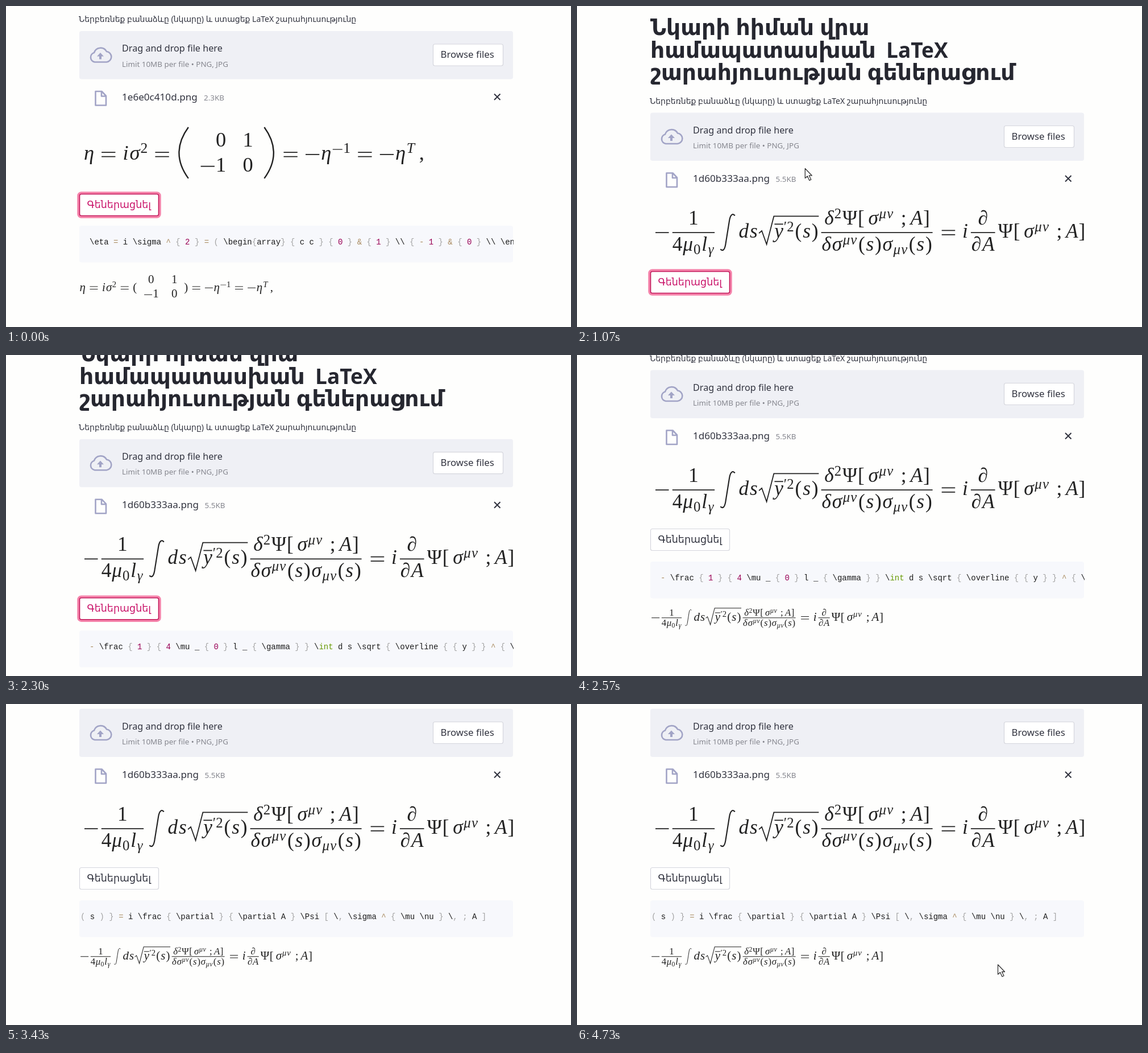
An HTML page that plays this animation: 994 by 564 pixels, repeating every 4.76 s.

```html
<!DOCTYPE html>
<html lang="hy">
<head>
<meta charset="utf-8">
<style>
  html, body { margin: 0; width: 100%; height: 100%; overflow: hidden; background: #fefefd; }
  svg { display: block; font: 16.2px 'Noto Sans', 'DejaVu Sans', sans-serif; fill: #31333f; }
  text { white-space: pre; }
  .title { font-size: 39.2px; font-weight: 700; fill: #262730; }
  .latin { font-size: 37px; }
  .label { font-size: 14px; }
  .hint { font-size: 13.4px; fill: #85868e; }
  .name { font-size: 17.1px; }
  .browse { font-size: 16.8px; }
  .action { font-size: 17.5px; }
  .panel { fill: #eff0f5; }
  .box { fill: #fff; stroke: #d5d6dd; stroke-width: 1.2; }
  .icon { fill: none; stroke: #a2a4c6; stroke-width: 2.6; stroke-linejoin: round; }
  .ring { fill: none; stroke: #f584ab; stroke-width: 4.5; visibility: hidden; }
  .focus .ring { visibility: visible; }
  .focus .box { stroke: #c2185b; stroke-width: 1.6; }
  .focus text { fill: #c9146a; }
  .code { font: 14px 'Liberation Mono', monospace; fill: #1c1c1c; }
  .number { fill: #990055; }
  .mark { fill: #a3a3a3; }
  .operator { fill: #a98a5f; }
  .keyword { fill: #669900; }
  .math { font-family: 'Liberation Serif', serif; fill: #222; }
  .line { fill: none; stroke: #222; }
  .pointer { fill: #fff; stroke: #333; stroke-width: 1.3; stroke-linejoin: round; }
  .status { fill: none; stroke: #a9aab0; stroke-width: 2.4; stroke-linecap: round; }
</style>
</head>
<body>
<svg id="stage" width="994" height="564" viewBox="0 0 994 564"></svg>
<script>
const LOOP = 4760, UPLOADED = 570, PREVIEW = 800, RESULT = 1900, BLUR = 2480;
const CHAR = 8.4, CODE_X = 147;

const codeA = String.raw`\eta = i \sigma ^ { 2 } = ( \begin{array} { c c } { 0 } & { 1 } \\ { - 1 } & { 0 } \\ \end{array} )`;
const codeB = String.raw`- \frac { 1 } { 4 \mu _ { 0 } l _ { \gamma } } \int d s \sqrt { \overline { { y } } ^ { \prime 2 } ( s ) } \frac { \delta ^ { 2 } \Psi [ \, \sigma ^ { \mu \nu } \, ; A ] } { \delta \sigma ^ { \mu \nu } ( s ) \sigma _ { \mu \nu } ( s ) } = i \frac { \partial } { \partial A } \Psi [ \, \sigma ^ { \mu \nu } \, ; A ]`;
const codeShift = codeB.lastIndexOf('( s ) } = i') * CHAR + CODE_X - 130;

const text = (x, y, s, cls = '') => `<text x="${x}" y="${y}" class="${cls}">${s}</text>`;
const group = (id, y, body) => `<g id="${id}" transform="translate(0 ${y})">${body}</g>`;

function highlight(code) {
  const classes = ['number', 'mark', 'operator', 'keyword'];
  return code.replace(/(\d)|([{}[\]();,])|([-^=&])|(\bint\b)/g, (token, ...found) =>
    `<tspan class="${classes[found.findIndex(Boolean)]}">${token.replace('&', '&amp;')}</tspan>`);
}

const codeBlock = (id, y, code) => group(id, y,
  `<rect x="129" width="763" height="64.5" rx="4" fill="#f7f8fc"/>
   <g clip-path="url(#codeClip)"><g id="${id}Text">${text(CODE_X, 33, highlight(code), 'code')}</g></g>`);

// Formula layout: a node maps (em, display) to a box { w, draw(x, baseline) }; lengths are in em.
const AXIS = -0.25, THIN = 0.167;
const ruler = document.createElement('canvas').getContext('2d');
const stroke = (x, y, em, d, width = 0.05) =>
  `<path class="line" transform="translate(${x} ${y}) scale(${em})" stroke-width="${width}" d="${d}"/>`;
const shape = (w, d, width) => em => ({ w: w * em, draw: (x, y) => stroke(x, y, em, d, width) });

const symbols = {
  ' ': shape(THIN, ''),
  '−': shape(0.778, `M.056 ${AXIS}h.666`),
  '=': shape(1.334, 'M.334-.355h.666m-.666.21h.666'),
};

const glyph = char => symbols[char] || (em => {
  const style = /[a-zα-ω∂]/i.test(char) && char !== 'Ψ' ? 'italic' : 'normal';
  ruler.font = `${style} 100px 'Liberation Serif', serif`;
  const bearing = /[a-zα-ω∂()]/i.test(char) ? 0.025 : 0;
  return {
    w: (ruler.measureText(char).width / 100 + 2 * bearing) * em,
    draw: (x, y) => `<text class="math" x="${x + bearing * em}" y="${y}" font-size="${em}" font-style="${style}">${char}</text>`,
  };
});

const row = (...items) => (em, display) => {
  const nodes = items.flatMap(item => typeof item === 'string' ? [...item].map(glyph) : item);
  const boxes = nodes.map(node => node(em, display));
  return {
    w: boxes.reduce((sum, box) => sum + box.w, 0),
    draw: (x, y) => boxes.map(box => { x += box.w; return box.draw(x - box.w, y); }).join(''),
  };
};

const script = (s, rise) => em => {
  const box = row(s)(em * 0.7);
  return { w: box.w + 0.03 * em, draw: (x, y) => box.draw(x, y - rise * em) };
};
const sup = s => script(s, 0.32);
const sub = s => script(s, -0.17);

const frac = (top, bottom) => (em, display) => {
  const boxes = [top, bottom].map(node => node(display ? em : em * 0.8));
  const bar = Math.max(...boxes.map(box => box.w)), pad = 0.12 * em, rise = (display ? 0.65 : 0.43) * em;
  return {
    w: bar + 2 * pad,
    draw: (x, y) => stroke(x + pad, y, em, `M0 ${AXIS}h${bar / em}`) +
      boxes.map((box, i) => box.draw(x + pad + (bar - box.w) / 2, y + (i ? rise : -rise))).join(''),
  };
};

const root = body => em => {
  const box = body(em), sign = 0.78 * em;
  return {
    w: sign + box.w,
    draw: (x, y) => box.draw(x + sign, y) +
      stroke(x, y, em, `M.04-.22l.14-.12 .24.67 .36-1.39h${box.w / em}`),
  };
};

const overline = s => em => {
  const box = row(s)(em);
  return { w: box.w, draw: (x, y) => box.draw(x, y) + stroke(x, y, em, `M.03-.67h${box.w / em - 0.06}`) };
};

const integral = (em, display) => {
  const size = display ? em : em * 0.75;
  return {
    w: 0.72 * size + 2 * THIN * em,
    draw: (x, y) => stroke(x + THIN * em + 0.36 * size, y + AXIS * em, size,
      'M-.36.82c.12.12.2.04.25-.2l.2-1.24c.05-.28.17-.36.27-.22', 0.06),
  };
};

const matrix = (...lines) => (em, display) => {
  const cells = lines.map(line => line.map(s => row(s)(em)));
  const widths = lines[0].map((_, col) => Math.max(...cells.map(line => line[col].w)));
  const pad = (display ? 0.4 : 0.53) * em, align = display ? 1 : 0.5;
  const fence = (char, d) => (display ? shape(0.74, d, 0.065) : glyph(char))(em);
  const open = fence('(', 'M.6-1.56q-.9 1.23 0 2.46'), close = fence(')', 'M.14-1.56q.9 1.23 0 2.46');
  const w = 2 * open.w + widths.reduce((sum, width) => sum + width + 2 * pad, 0);
  return {
    w,
    draw(x, y) {
      let out = open.draw(x, y) + close.draw(x + w - close.w, y), left = x + open.w + pad;
      widths.forEach((width, col) => {
        cells.forEach((line, i) => {
          out += line[col].draw(left + (width - line[col].w) * align, y + (i * 1.2 - 0.63) * em);
        });
        left += width + 2 * pad;
      });
      return out;
    },
  };
};

const bracket = row('Ψ[ σ', sup('μν'), '  ; A]');
const formulaA = row('η=iσ', sup('2'), '=', matrix(['0', '1'], ['−1', '0']),
  '=−η', sup('−1'), '=−η', sup('T'), ' ,');
const formulaB = row('−', frac(row('1'), row('4μ', sub('0'), 'l', sub('γ'))), integral, 'ds',
  root(row(overline('y'), sup('′2'), '(s)')),
  frac(row('δ', sup('2'), bracket), row('δσ', sup('μν'), '(s)σ', sub('μν'), '(s)')),
  '=i', frac(row('∂'), row('∂A')), bracket);

const fileRow = (id, name, size, x) => group(id, 0, text(204, 309, name, 'name') + text(x, 309, size, 'hint'));

stage.innerHTML = `
  <clipPath id="codeClip"><rect x="129" width="764" height="65"/></clipPath>
  <g id="page">
    ${text(129, 51, 'Նկարի հիման վրա', 'title')}
    ${text(129, 90.5, 'համապատասխան', 'title')}
    ${text(544, 90.5, 'LaTeX', 'title latin')}
    ${text(129, 130, 'շարահյուսության գեներացում', 'title')}
    ${text(128, 171.5, 'Ներբեռնեք բանաձևը (նկարը) և ստացեք LaTeX շարահյուսությունը', 'label')}
    <rect class="panel" x="129" y="187.5" width="763" height="84.5" rx="4"/>
    <path class="icon" d="M156 242a8.5 8.5 0 0 1-1-16.5a12 12 0 0 1 22-2a9.3 9.3 0 0 1 0 18.5z"/>
    <path d="M160 232l6-6.5 6 6.5h-4v5h-4v-5z" fill="#a2a4c6"/>
    ${text(204, 223.5, 'Drag and drop file here')}
    ${text(204, 250, 'Limit 10MB per file • PNG, JPG', 'hint')}
    <rect class="box" x="751.5" y="210.5" width="123" height="38" rx="3"/>
    ${text(764.5, 234.5, 'Browse files', 'browse')}
    <path class="icon" d="M157.5 293.5h11l7.5 8v16.5h-18.5zM168 294v8h7.5"/>
    <path d="M859 298l10.5 10.5m0-10.5l-10.5 10.5" stroke="#31333f" stroke-width="2"/>
    ${fileRow('fileA', '1e6e0c410d.png', '2.3KB', 348)}
    ${fileRow('fileB', '1d60b333aa.png', '5.5KB', 349.5)}
    <g id="imageA">${formulaA(36.5, true).draw(136, 413.5)}</g>
    <g id="imageB">${formulaB(35.4, true).draw(136, 407)}</g>
    <g id="button">
      <rect class="ring" x="127.5" y="-1.5" width="143" height="42" rx="5"/>
      <rect class="box" x="129.5" y=".5" width="139" height="38" rx="3"/>
      ${text(142.5, 25, 'Գեներացնել', 'action')}
    </g>
    ${codeBlock('codeA', 529.5, codeA)}
    ${codeBlock('codeB', 524, codeB)}
    <g id="resultA">${formulaA(21, false).draw(129, 644)}</g>
    <g id="resultB">${formulaB(21, false).draw(130, 628)}</g>
  </g>
  <path id="runner" class="status" d="M970 1l6 5 9 8M984 0l-8 7-6 6M975 3l8 3M979 9l7 6"/>
  <path id="swimmer" class="status" d="M967 7q4-4 8 0t8 0 6 0M967 12q4-4 8 0t8 0 6 0M973 2l6-2 5 3"/>
  <g id="cursor" class="pointer">
    <path id="beam" d="M-4-8q4 0 4 2q0-2 4-2M0-6v12M-4 8q4 0 4-2q0 2 4 2" fill="none"/>
    <path id="hand" d="M-4-8q2-3 4 0v5l8 2q2 1 1 5l-2 5h-8l-7-8q0-3 3-1z"/>
    <path id="arrow" d="M0 0v17l4-3.5 3.5 7.5 3-1.5-3.5-7h5z"/>
  </g>`;

const el = id => document.getElementById(id);
const show = (id, on) => el(id).setAttribute('visibility', on ? 'inherit' : 'hidden');
const move = (id, x, y) => el(id).setAttribute('transform', `translate(${x} ${y})`);

// Eased progress from 0 to 1 between two times.
function ease(t, start, end) {
  const u = Math.min(1, Math.max(0, (t - start) / (end - start)));
  return u * u * (3 - 2 * u);
}

function draw(t) {
  const first = t < UPLOADED, preview = t >= PREVIEW, result = t >= RESULT;
  const scroll = first ? 143.5 :
    23 * ease(t, 1200, 1380) + 138 * ease(t, 2240, 2520) + 18 * ease(t, 2700, 2850);
  move('page', 0, -scroll);
  for (const id of ['fileA', 'imageA', 'codeA', 'resultA']) show(id, first);
  show('fileB', !first);
  show('imageB', preview);
  show('codeB', result);
  show('resultB', result);
  move('button', 0, first ? 473.5 : preview ? 466 : 347);
  el('button').setAttribute('class', t < BLUR ? 'focus' : '');
  move('codeBText', -codeShift * ease(t, 2780, 3250), 0);

  show('runner', t >= UPLOADED && t < 900);
  show('swimmer', t >= 1470 && t < RESULT);

  const kind = t < 800 ? 'beam' : t > 1300 && t < 1750 ? 'hand' : 'arrow';
  for (const id of ['beam', 'hand', 'arrow']) show(id, id === kind);
  show('cursor', (t >= 530 && t < 2130) || t >= 4450);
  const reach = ease(t, 750, 1350), leave = ease(t, 1700, 2100), back = ease(t, 4450, 4650);
  if (t < 3000) move('cursor', 614 - 385 * reach + 30 * leave, 70 + 390 * reach + 120 * leave);
  else move('cursor', 715 + 25.5 * back, 440 + 18 * back);
}

function tick() {
  draw(performance.now() % LOOP);
  requestAnimationFrame(tick);
}
tick();
</script>
</body>
</html>
```
